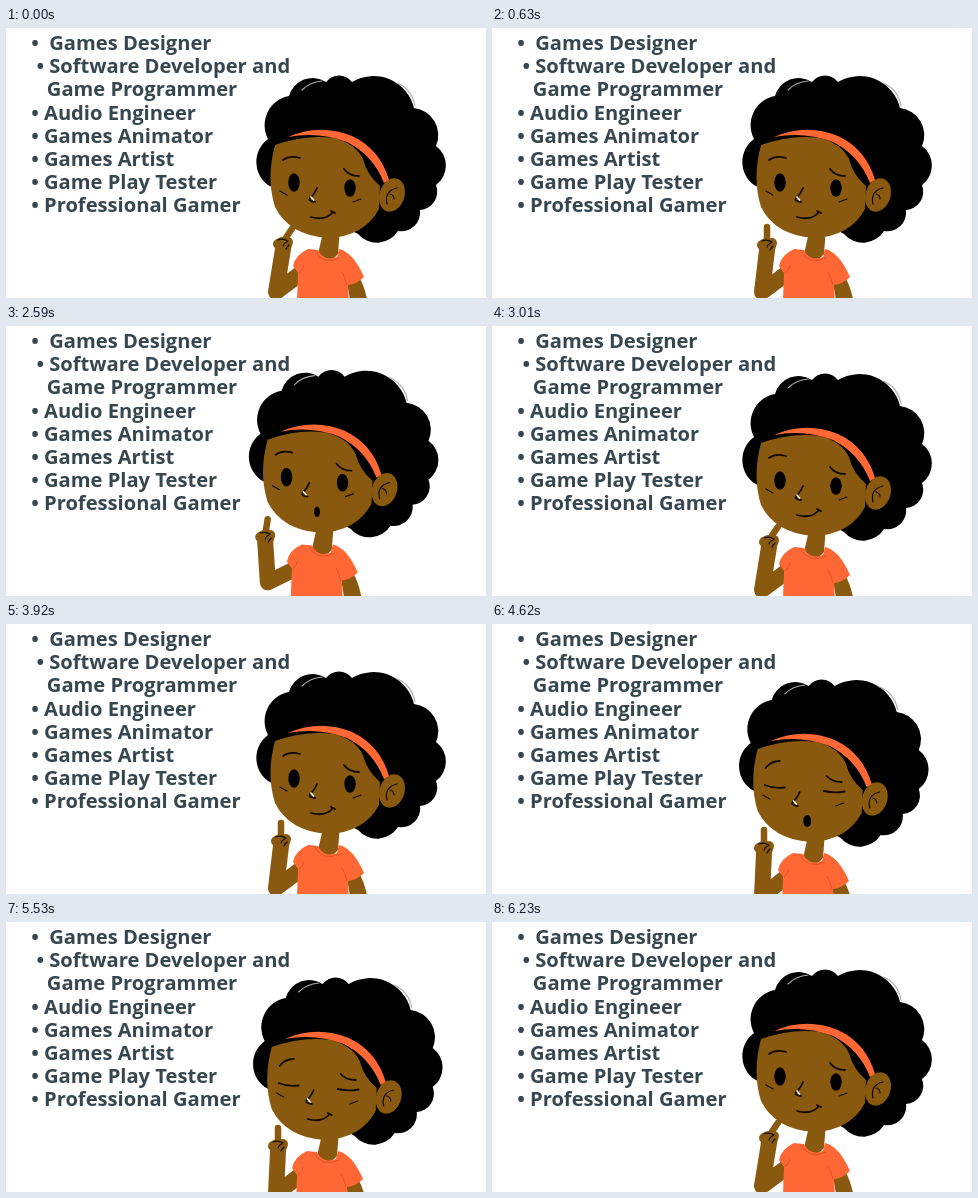
An HTML page that plays this animation: 480x270 px, repeating every 6.3 s.

```html
<!DOCTYPE html>
<html lang="en">
<head>
<meta charset="utf-8">
<title>Jobs in games</title>
<style>
html, body { margin: 0; width: 100%; height: 100%; overflow: hidden; background: #fff; }
svg { display: block; width: 480px; height: 270px; }
text { font: 700 20.15px "Open Sans", "Noto Sans", sans-serif; fill: #37474f; white-space: pre; }
.skin { fill: #89590f; }
.limb { fill: none; stroke: #89590f; stroke-linecap: round; stroke-linejoin: round; }
.ink { fill: none; stroke: #120b04; stroke-width: 1.8; stroke-linecap: round; stroke-linejoin: round; }
.thin { stroke-width: 1.2; }
.cloth { fill: #ff6835; }
.seam { fill: none; stroke: #d9572a; }
.shine { fill: none; stroke: #aaa; stroke-width: 1.1; stroke-linecap: round; }
</style>
</head>
<body>
<svg viewBox="0 0 480 270">
  <g id="list"></g>

  <g id="hair">
    <path id="curls"/>
    <path class="shine" d="M296 62 Q304 54 316 53 M391 55 Q406 61 409 78"/>
  </g>

  <path id="arm" class="limb" stroke-width="16"/>

  <g id="body">
    <path class="skin" d="M341 254 L353 249 Q361 262 364 290 H347 Z"/>
    <path class="skin" d="M318 200 L312 226 Q320 240 332 226 L334 200 Z"/>
    <path class="cloth" d="M302 221 L312 222 Q318 234 331 229 L333 221 Q347 224 358 249 Q351 256 342 257 L344 300 H290 L292 245 L287 238 Q289 227 302 221 Z"/>
    <path class="seam" d="M308 222 Q317 238 334 230 M293 245 Q297 242 298 237 M341 257 Q339 249 336 244"/>
  </g>

  <g id="head">
    <path class="skin" d="M269 117 Q300 106 328 110 Q349 115 357 131 Q361 147 374 158 L373 181 Q358 209 321 210 Q283 207 269 179 Q260 150 269 117 Z"/>
    <ellipse class="skin" cx="386" cy="167" rx="12.5" ry="17" transform="rotate(18 386 167)"/>
    <path class="cloth" d="M282 109 Q314 95 346 108 Q374 121 383 152 L378 155 Q367 127 341 114 Q312 103 282 109 Z"/>
    <path class="ink thin" d="M381 176 Q378 163 391 160 M384 166 Q388 167 388 171"/>
    <path class="ink" d="M311 160 Q308 167 304 170 Q302 173 309 174"/>
    <path d="M304.500 168.500 L308 172.500" stroke="#fff" stroke-width="1.500"/>
    <path class="ink thin" d="M274 163 L281 167 M347 174 L355 171"/>
    <g id="open">
      <path class="ink" d="M277 132 Q284 127 294 130 M338 141 Q343 148 353 148"/>
      <ellipse cx="288" cy="154.500" rx="5.700" ry="9.300"/>
      <ellipse cx="344" cy="160" rx="5.700" ry="8.800"/>
    </g>
    <path id="shut" class="ink" d="M277 136 Q282 129 291 129 M338 144 Q343 150 353 150 M276 153 Q285 157 296 155.500 M335 159 Q346 161.500 356 159.500"/>
    <path id="smile" class="ink" d="M305 189 Q320 193 327 184 M325 183 L329 185"/>
    <ellipse id="oh" cx="318.500" cy="189"/>
  </g>

  <g id="hand">
    <path class="limb" d="M-5 -5 L-1 -7 M5 -7 L3 -1" stroke-width="10"/>
    <path id="finger" class="limb" d="M0 0 V-16" stroke-width="6.500"/>
    <path class="ink thin" d="M-5 -9 Q0 -11 5 -8 Q1 -6 0 -3 M6 -4 Q4 -2 3 0"/>
  </g>
</svg>
<script>
const LOOP = 6300, STEP = 70, TAP = 420;
const RISES = [1680, 4480], HOLD = 840;
const TAPPING = [[0, 1260], [3290, 4130]];

const $ = id => document.getElementById(id);
const show = (id, on) => $(id).setAttribute("visibility", on ? "visible" : "hidden");
const move = (id, [x, y]) => $(id).setAttribute("transform", `translate(${x} ${y})`);
const clamp = u => Math.min(1, Math.max(0, u));
const ease = u => (u = clamp(u), u * u * (3 - 2 * u));
const bump = u => Math.sin(Math.PI * clamp(u)) ** 2;

const JOBS = `•\u00a0\u00a0Games Designer
• Software Developer and
Game Programmer
• Audio Engineer
• Games Animator
• Games Artist
• Game Play Tester
• Professional Gamer`;
const INDENT = [0, 5.2, 15.6];

JOBS.split("\n").forEach((job, i) => {
  const line = document.createElementNS("http://www.w3.org/2000/svg", "text");
  line.setAttribute("x", 25.2 + (INDENT[i] || 0));
  line.setAttribute("y", 22 + 23.2 * i);
  line.textContent = job;
  $("list").append(line);
});

// Each curl is an arc between two notches, as round as it is wide.
function curls(notches) {
  return notches.reduce((path, [x, y], i) => {
    if (!i) return `M${x} ${y}`;
    const [px, py] = notches[i - 1], r = 0.62 * Math.hypot(x - px, y - py);
    return `${path} A${r} ${r} 0 0 1 ${x} ${y}`;
  }, "");
}
$("curls").setAttribute("d", curls([
  [262, 157], [262, 111], [283, 68], [320, 54], [346, 54], [408, 80],
  [430, 118], [430, 157], [414, 182], [392, 203], [352, 206]
]));

// How far she ducks, has the idea, and leans the finger to her chin.
function poseAt(t) {
  let dip = 0, idea = 0, lean = 1, talk = false;
  for (const rise of RISES) {
    const u = t - rise, v = u - HOLD;
    dip += bump(u / 280) + bump(v / 420);
    idea += ease((u - 140) / 210) - ease(v / 210);
    talk ||= u >= STEP && v < 210;
  }
  for (const [from, to] of TAPPING) {
    if (t >= from && t < to) lean = 0.5 + 0.5 * Math.cos(2 * Math.PI * (t - from) / TAP);
  }
  lean = Math.min(lean, 1 - Math.max(dip, idea));
  return { dip, idea, lean, talk };
}

function draw(t) {
  const { dip, idea, lean, talk } = poseAt(t);
  const at = (x, y, low, high) =>
    [x + dip * low[0] + idea * high[0], y + dip * low[1] + idea * high[1]];

  const head = at(0, 0, [-3.3, 8], [-9, -7.2]);
  const body = at(0, 0, [-1, 8], [-8, -6]);
  const wrist = at(275 + 2 * lean, 222 - lean, [-3, 7], [-21, -10]);
  const elbow = at(270, 264, [0, 8], [-11, -13]);
  const shoulder = [294 + body[0], 246 + body[1]];

  move("hair", head);
  move("head", head);
  move("body", body);
  move("hand", wrist);
  $("arm").setAttribute("d", `M${wrist} L${elbow} L${shoulder}`);
  $("finger").setAttribute("transform", `translate(0 -7) rotate(${34 * lean})`);

  const blink = dip > 0.25;
  show("open", !blink);
  show("shut", blink);
  show("smile", !talk);
  show("oh", talk);
  $("oh").setAttribute("rx", 2.6 + 1.4 * dip);
  $("oh").setAttribute("ry", 5 + dip);
}

const start = performance.now();
function tick() {
  const t = (performance.now() - start) % LOOP;
  draw(Math.floor(t / STEP) * STEP);
  requestAnimationFrame(tick);
}
tick();
</script>
</body>
</html>
```
